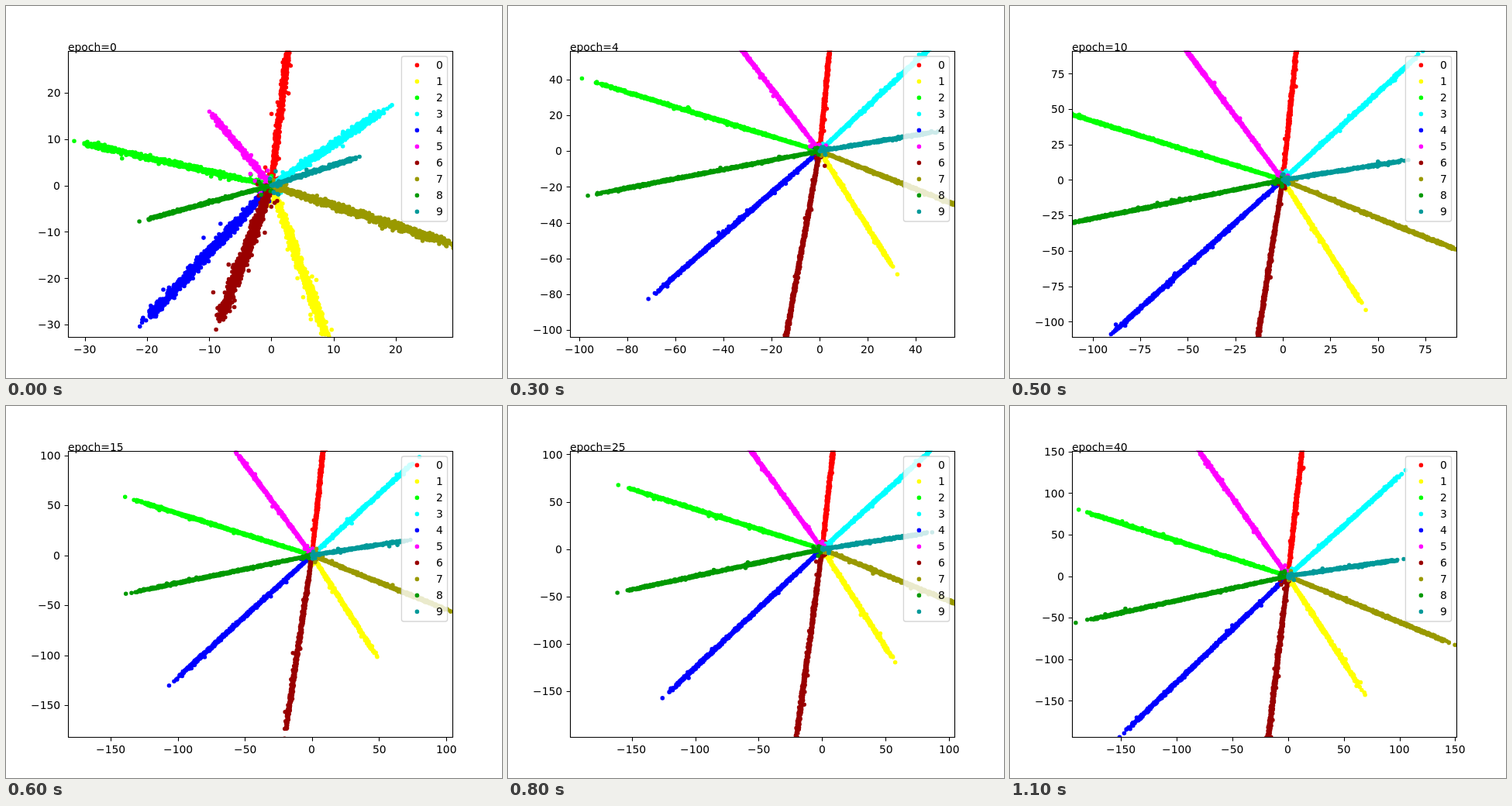
An HTML page with a canvas that plays this animation: 640x480 px, repeating every 1.2 s.

```html
<!DOCTYPE html>
<html lang="en">
<head>
<meta charset="utf-8">
<title>Feature clusters by epoch</title>
<style>
html, body { margin: 0; width: 100%; height: 100%; overflow: hidden; background: #fff }
canvas { display: block }
</style>
</head>
<body>
<canvas id="stage" width="640" height="480"></canvas>
<script>
const ctx = document.getElementById('stage').getContext('2d');
const EPOCHS = [0, 1, 2, 4, 7, 10, 15, 20, 25, 30, 35, 40];
const STEP_MS = 100;
const LAST = EPOCHS.length - 1;
const BOX = { x: 80, y: 57.6, w: 496, h: 369.6 };
const TAIL = .14; // outer part of a ray where the dots thin out

// Limits shared by both axes, at key steps.
const LIMITS = [
  { step: 0, lo: -32.7, hi: 29.1 },
  { step: 1, lo: -56.2, hi: 40.6 },
  { step: 3, lo: -103.9, hi: 56.1 },
  { step: 5, lo: -110.9, hi: 91.3 },
  { step: 6, lo: -181.8, hi: 104.6 },
  { step: 8, lo: -198.5, hi: 104 },
  { step: 11, lo: -193.8, hi: 151.1 }
];

// Angle in degrees and reach in axis units: untrained, after one epoch, at the end.
const RAYS = [
  { color: '#f00', angle: [83.1, 85, 83.6], reach: [24, 35, 125], spread: 1.5 },
  { color: '#ff0', angle: [-70, -58.4, -57], reach: [27.5, 32.5, 127], spread: 2.4 },
  { color: '#0f0', angle: [167.3, 163.5, 162.4], reach: [32.5, 60, 197], spread: 1.4 },
  { color: '#0ff', angle: [33.7, 43.9, 42], reach: [23.3, 49, 142], spread: 1.9 },
  { color: '#00f', angle: [227, 218.4, 223.7], reach: [31, 48, 209], spread: 2.8 },
  { color: '#f0f', angle: [130, 129.3, 125.4], reach: [15.5, 37.3, 145], spread: 1.2 },
  { color: '#900', angle: [249, 257, 263], reach: [24.8, 50, 195], spread: 3.2 },
  { color: '#990', angle: [-17.9, -20.8, -22.4], reach: [32, 41, 162], spread: 2.2 },
  { color: '#090', angle: [195.2, 189.6, 192.4], reach: [22, 55, 195], spread: .7 },
  { color: '#099', angle: [18.1, 10.4, 8.4], reach: [14.9, 26.6, 105], spread: .9 }
];

const lerp = (a, b, t) => a + (b - a) * t;

function limitsAt(step) {
  const i = LIMITS.findIndex(key => key.step >= step);
  const next = LIMITS[i], prev = LIMITS[i - 1] || next;
  const t = (step - prev.step) / (next.step - prev.step || 1);
  return [lerp(prev.lo, next.lo, t), lerp(prev.hi, next.hi, t)];
}

// After the first epoch rays turn with the log of time and grow by a power law.
function poseAt({ angle, reach, spread }, step) {
  if (step === 0) return { angle: angle[0], reach: reach[0], spread };
  const t = Math.log(step) / Math.log(LAST);
  return {
    angle: lerp(angle[1], angle[2], t),
    reach: reach[1] * (reach[2] / reach[1]) ** t,
    spread: .5 + spread * .08
  };
}

function seeded(seed) {
  return () => {
    seed = (Math.imul(seed, 1664525) + 1013904223) >>> 0;
    return seed / 4294967296;
  };
}

function dot(x, y) {
  ctx.moveTo(x + 2.78, y);
  ctx.arc(x, y, 2.78, 0, 7);
}

function drawRay(ray, step, ox, oy, scale, rand) {
  const { angle, reach, spread } = poseAt(ray, step);
  const gauss = () => (rand() + rand() + rand() - 1.5) * 2;
  const cos = Math.cos(angle * Math.PI / 180), sin = Math.sin(angle * Math.PI / 180);
  const put = (along, across) => dot(ox + along * cos + across * sin, oy - along * sin + across * cos);
  const length = reach * scale;
  const scatter = 5 + 8 / (step + 1);
  ctx.fillStyle = ray.color;
  ctx.beginPath();
  for (let i = 0; i < length * 4; i++) {
    const u = rand(), stray = rand() < .02 ? 3 : 1;
    const across = gauss() * spread * stray * Math.min(1, .4 + u * 2);
    if (rand() < ((1 - u) / TAIL) ** 2) put(u * length, across);
  }
  put(length, 0);
  for (let i = 0; i < 10; i++) put(Math.abs(gauss()) * scatter, gauss() * scatter * .6);
  ctx.fill();
}

function line(x1, y1, x2, y2) {
  ctx.moveTo(x1, y1);
  ctx.lineTo(x2, y2);
}

// Places text on whole pixels; shift is the share of its width left of x.
function text(str, x, y, shift = 0) {
  ctx.fillText(str, Math.round(x - ctx.measureText(str).width * shift), Math.round(y));
}

function drawAxes(lo, hi, ox, oy) {
  const range = hi - lo;
  const gap = range < 70 ? 10 : range < 165 ? 20 : range < 240 ? 25 : 50;
  const snap = v => Math.floor(v + .5) + .5;
  ctx.strokeStyle = ctx.fillStyle = '#000';
  ctx.lineWidth = 1.11;
  ctx.beginPath();
  ctx.rect(80.5, 58.5, 496, 369);
  for (let v = Math.ceil(lo / gap) * gap; v <= hi; v += gap) {
    const x = ox + v * BOX.w / range, y = oy - v * BOX.h / range;
    const label = (v < 0 ? '\u2212' : '') + Math.abs(v);
    line(snap(x), 427.5, snap(x), 432.4);
    line(75.6, snap(y), 80.5, snap(y));
    text(label, x, 448, .5);
    text(label, 70.3, y + 5.3, 1);
  }
  ctx.stroke();
}

function drawLegend() {
  ctx.beginPath();
  ctx.roundRect(510.4, 65, 59.2, 213, 2.8);
  ctx.fillStyle = 'rgba(255,255,255,.8)';
  ctx.fill();
  ctx.strokeStyle = 'rgba(204,204,204,.8)';
  ctx.lineWidth = 1.39;
  ctx.stroke();
  RAYS.forEach(({ color }, i) => {
    const y = 76.4 + i * 21;
    ctx.beginPath();
    ctx.fillStyle = color;
    dot(530.4, y);
    ctx.fill();
    ctx.fillStyle = '#000';
    text(i, 555.3, y + 4.9);
  });
}

function draw(step) {
  const [lo, hi] = limitsAt(step);
  const scale = BOX.w / (hi - lo);
  const ox = BOX.x - lo * scale, oy = BOX.y + hi * BOX.h / (hi - lo);
  const rand = seeded(step * 977 + 41);
  ctx.fillStyle = '#fff';
  ctx.fillRect(0, 0, 640, 480);
  ctx.font = '13.89px "DejaVu Sans", sans-serif';
  ctx.save();
  ctx.beginPath();
  ctx.rect(BOX.x, BOX.y, BOX.w, BOX.h);
  ctx.clip();
  for (const ray of RAYS) drawRay(ray, step, ox, oy, scale, rand);
  ctx.restore();
  drawAxes(lo, hi, ox, oy);
  text('epoch=' + EPOCHS[step], 80, 58);
  drawLegend();
}

let shown = -1;
function tick() {
  const step = Math.floor(performance.now() / STEP_MS) % EPOCHS.length;
  if (step !== shown) draw(shown = step);
  requestAnimationFrame(tick);
}
tick();
</script>
</body>
</html>
```
